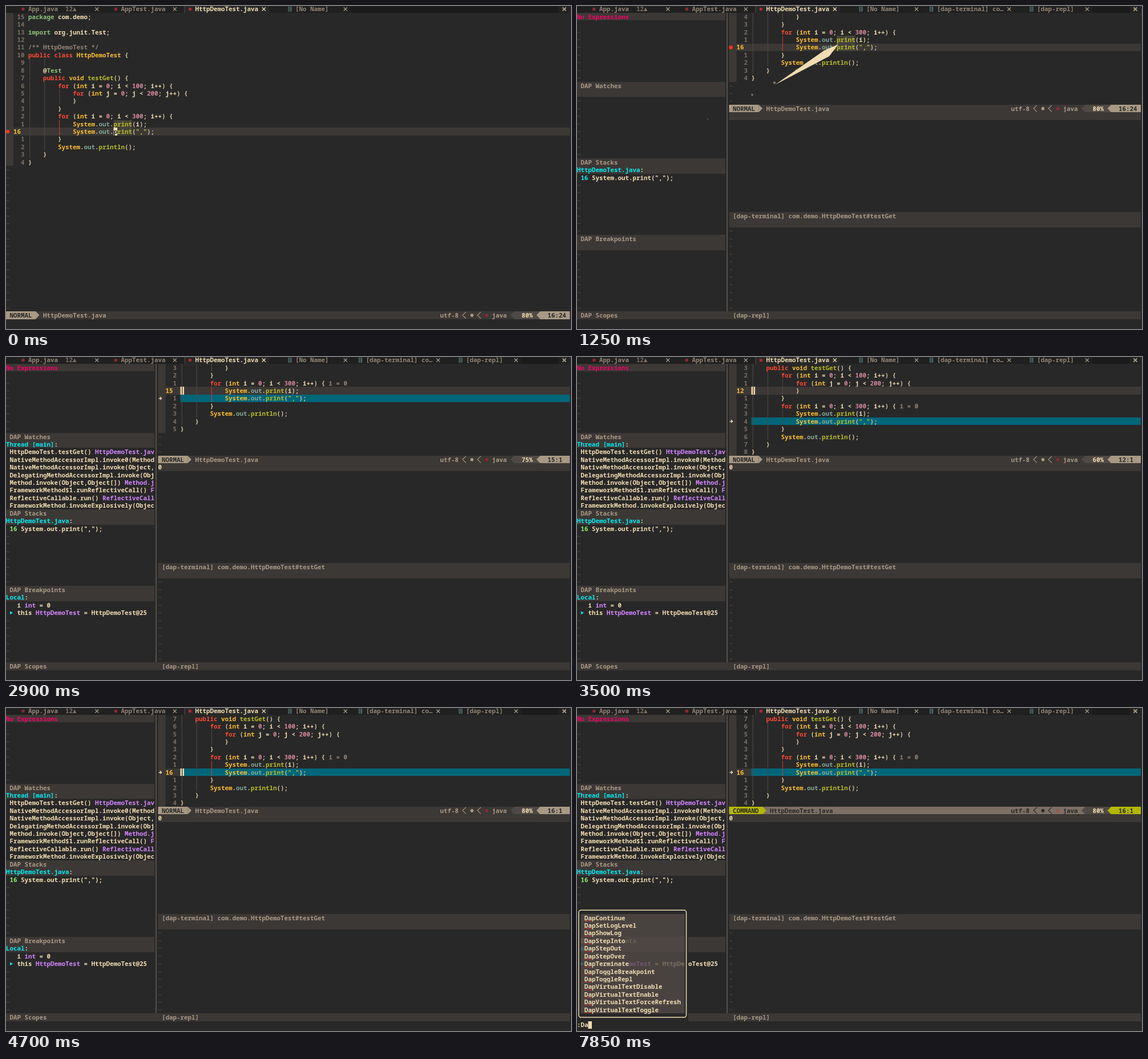
Write an HTML page with a canvas that moves like this. It is 990 px wide and 566 px high and loops after 8 s.

```html
<!DOCTYPE html>
<html lang="en">
<head>
<meta charset="utf-8">
<title>Debugger session</title>
<style>
html, body { margin: 0; width: 100%; height: 100%; overflow: hidden; background: #282828; }
canvas { display: block; }
</style>
</head>
<body>
<canvas id="stage" width="990" height="566"></canvas>
<script>
const g = document.getElementById('stage').getContext('2d');
const CW = 6.5, RH = 13.415, COLS = 152;
const BG = '#282828', BAR = '#3c3836', MUTED = '#a89984', CREAM = '#f0dcb0', DARK = '#1b1b1b';
const TEAL = '#00667a', GUIDE = '#504945', LIME = '#b5b800';
// Colour codes used in text as "~x"
const COLORS = {
  f: CREAM, d: '#d5c4a1', r: '#fb4934', y: '#fabd2f', g: '#b8bb26', a: '#8ec07c', b: '#83a598',
  n: '#d3869b', c: '#928374', m: MUTED, k: '#282828', l: '#7c6f64', t: '#5a524c',
  C: '#00ecf2', G: '#8ef06a', M: '#d484ff', P: '#f50067'
};

const forLoop = (v, n) => `~rfor ~d(~yint ~f${v} = ~n0~d; ~f${v} < ~n${n}~d; ~f${v}++~d) {`;
const call = (fn, arg) => `~ySystem~d.~bout~d.~g${fn}~d(${arg}~d);`;
const pad = n => ' '.repeat(n);
const CODE = [
  '~apackage ~fcom.demo~d;', '', '~aimport ~forg.junit.Test~d;', '',
  '~c/** HttpDemoTest */', '~rpublic class ~yHttpDemoTest ~d{', '',
  pad(4) + '~f@~aTest',
  pad(4) + '~rpublic ~yvoid ~gtestGet~d() {',
  pad(8) + forLoop('i', 100),
  pad(12) + forLoop('j', 200),
  pad(12) + '~d}', pad(8) + '~d}',
  pad(8) + forLoop('i', 300),
  pad(12) + call('print', '~fi'),
  pad(12) + call('print', '~g","'),
  pad(8) + '~d}',
  pad(8) + call('println', ''),
  pad(4) + '~d}', '~d}'
];
const THREADS = [
  '~CThread [main]~f:',
  ' HttpDemoTest.testGet() ~MHttpDemoTest.jav',
  ' NativeMethodAccessorImpl.invoke0(Method',
  ' NativeMethodAccessorImpl.invoke(Object,',
  ' DelegatingMethodAccessorImpl.invoke(Obj',
  ' Method.invoke(Object,Object[]) ~MMethod.j',
  ' FrameworkMethod$1.runReflectiveCall() ~MF',
  ' ReflectiveCallable.run() ~MReflectiveCall',
  ' FrameworkMethod.invokeExplosively(Objec'
];
const ALL = ['!', '#', '&', '<', '=', '>', '@', 'Alpha', 'AlphaRedraw', 'BufferCloseOther',
  ...['CloseLeft', 'CloseRight', 'CycleNext', 'CyclePrev', 'GoToBuffer', 'GroupClose',
    'GroupToggle', 'MoveNext'].map(s => 'BufferLine' + s)];
const DAP = ['Continue', 'SetLogLevel', 'ShowLog', 'StepInto', 'StepOut', 'StepOver', 'Terminate',
  'ToggleBreakpoint', 'ToggleRepl', 'VirtualTextDisable', 'VirtualTextEnable',
  'VirtualTextForceRefresh', 'VirtualTextToggle'].map(s => 'Dap' + s);
// [time, cursor line]
const MOVES = [[2900, 15], [3050, 14], [3200, 13], [3500, 12],
  [3800, 13], [4100, 14], [4400, 15], [4700, 16]];

const rowTop = r => r * RH - 1.5;
const mid = r => rowTop(r) + RH / 2 + .3;

function box(c, r, w, color, h = 1) {
  const y = Math.round(rowTop(r));
  g.fillStyle = color;
  g.fillRect(c * CW, y, w * CW, Math.round(rowTop(r + h)) - y);
}

function put(c, r, text, weight = 600) {
  g.font = `${weight} 10.833px "Noto Sans Mono", "DejaVu Sans Mono", monospace`;
  g.fillStyle = CREAM;
  text.split(/~(.)/).forEach((part, i) => {
    if (i % 2) { g.fillStyle = COLORS[part]; return; }
    for (const ch of part) {
      if (ch !== ' ') g.fillText(ch, c * CW, rowTop(r) + 10.9);
      c++;
    }
  });
}

function path(pts) {
  g.beginPath();
  pts.forEach(p => g.lineTo(...p));
}

function poly(color, ...pts) {
  g.fillStyle = color;
  path(pts);
  g.fill();
}

function stroke(color, width, ...pts) {
  g.strokeStyle = color;
  g.lineWidth = width;
  path(pts);
  g.stroke();
}

function disc(x, y, radius, color) {
  g.fillStyle = color;
  g.beginPath();
  g.arc(x, y, radius, 0, 7);
  g.fill();
}

const icon = (c, r, color) => disc((c + .6) * CW, mid(r), 2.8, color);

function tildes(c, from, to) {
  for (let r = from; r <= to; r++) put(c, r, '~t\u223c', 500);
}

function cross(c, color, width = 1.2) {
  const x = (c + .5) * CW, y = mid(0);
  stroke(color, width, [x - 3, y - 3], [x + 3, y + 3]);
  stroke(color, width, [x + 3, y - 3], [x - 3, y + 3]);
}

function tab(from, to, iconCol, name, closeCol, kind) {
  const active = kind === 'active';
  box(from, 0, to - from, active ? BG : '#202020');
  if (kind === 'file') {
    const x = iconCol * CW + .5;
    g.strokeStyle = '#5f8a8b';
    g.lineWidth = 1;
    g.strokeRect(x + .5, 2, 5, 7);
    stroke('#5f8a8b', 1, [x + 2, 4.5], [x + 4.5, 4.5]);
    stroke('#5f8a8b', 1, [x + 2, 6.5], [x + 4.5, 6.5]);
  } else icon(iconCol, 0, active ? '#a82a35' : '#8a2832');
  put(iconCol + 2, 0, (active ? '~f' : '~c') + name, active ? 700 : 600);
  cross(closeCol, active ? CREAM : MUTED);
}

function tabs(open) {
  box(0, 0, COLS, DARK);
  tab(0, 27, 4, 'App.java', 24);
  put(16, 0, '~l12');
  poly('#7c6f64', [117, 9], [120, 2.5], [123.5, 9]);
  tab(27, 48, 29, 'AppTest.java', 45);
  tab(48, 71, 49, 'HttpDemoTest.java', 69, 'active');
  stroke(GUIDE, 1, [313, 0], [313, 12]);
  tab(71, 93, 76, '[No Name]', 91, 'file');
  if (open) {
    tab(93, 118, 95, '[dap-terminal] co…', 116, 'file');
    tab(118, 139, 122, '[dap-repl]', 137, 'file');
  }
  box(149, 0, 3, '#222222');
  cross(150, MUTED, 2);
}

function guides(c0, r, line, cur) {
  const draw = (n, color) => {
    const x = (c0 + 6 + n + .5) * CW - .5;
    stroke(color, 1, [x, rowTop(r)], [x, rowTop(r + 1)]);
  };
  if (line > 6 && line < 20) draw(0, GUIDE);
  if (line === 7 || line > 9 && line < 19) draw(4, GUIDE);
  if (line === 11 || line === 12) draw(8, GUIDE);
  if (line === 15 || line === 16) draw(8, cur > 14 ? '#e03a2c' : GUIDE);
}

function breakSign(c, r, paused) {
  const x = c * CW, y = mid(r);
  if (!paused) { disc(x + 3, y, 3.3, '#fb3320'); return; }
  stroke(CREAM, 1.4, [x + 1, y], [x + 6, y]);
  stroke(CREAM, 1.4, [x + 3.5, y - 2.5], [x + 6, y], [x + 3.5, y + 2.5]);
}

function codeCursor(c0, r, paused) {
  if (paused) {
    const x = (c0 + 6.5) * CW;
    box(c0 + 6, r, 1, CREAM);
    stroke('#4a4038', 1.4, [x, rowTop(r)], [x, rowTop(r + 1)]);
  } else {
    box(c0 + 29, r, 1, CREAM);
    put(c0 + 29, r, '~kp');
  }
}

function editor(c0, last, s) {
  for (let r = 1; r <= last; r++) {
    const line = s.top + r - 1, here = line === s.cur;
    if (line > 20) { tildes(c0, r, r); continue; }
    box(c0, r, here ? COLS - c0 : 2, BAR);
    if (line === 16) {
      if (s.paused) box(c0 + 6, r, COLS - c0 - 6, TEAL);
      breakSign(c0, r, s.paused);
    }
    if (!s.paused && (line === 15 || line === 16)) box(c0 + 29, r, 5, '#45433a');
    guides(c0, r, line, s.cur);
    const n = String(Math.abs(line - s.cur));
    if (here) put(c0 + 2, r, '~y' + line, 700);
    else put(c0 + 5 - n.length, r, '~l' + n);
    put(c0 + 6, r, CODE[line - 1]);
    if (s.paused && line === 14) put(c0 + 46, r, '~ci = 0');
    if (here && !s.cmd && !s.flying) codeCursor(c0, r, s.paused);
  }
}

function status(c0, r, s) {
  const mode = s.cmd ? 'COMMAND' : 'NORMAL', accent = s.cmd ? LIME : MUTED;
  const ink = s.cmd ? '~k' : '~m', line = s.cmd ? BG : MUTED;
  const w = mode.length + 2, y0 = rowTop(r), y1 = rowTop(r + 1), ym = (y0 + y1) / 2;
  const arrow = (c, dir, color) => poly(color, [c * CW, y0], [(c + dir) * CW, ym], [c * CW, y1]);
  box(c0, r, COLS - c0, s.cmd ? '#7c6f64' : BAR);
  box(c0, r, w, accent);
  arrow(c0 + w, 1, accent);
  put(c0 + 1, r, '~k' + mode);
  put(c0 + w + 2, r, ink + 'HttpDemoTest.java');
  put(117, r, ink + 'utf-8');
  for (const c of [123, 127]) {
    stroke(line, 1.1, [c * CW + 6.5, y0 + 1], [c * CW + .5, ym], [c * CW + 6.5, y1 - 1]);
  }
  icon(125, r, line);
  icon(129, r, s.cmd ? '#a8504a' : '#8a2832');
  put(131, r, ink + 'java');
  box(137, r, 7, GUIDE);
  arrow(137, -1, GUIDE);
  put(139, r, `~f${s.cur * 5}%`, 700);
  box(144, r, 8, accent);
  arrow(144, -1, accent);
  put(146, r, `~k${s.cur}:${s.paused ? 1 : 24}`);
}

function sidePanes(paused) {
  box(0, 1, 40, BAR);
  put(0, 1, '~PNo Expressions');
  tildes(0, 3, 9);
  ['Watches', 'Stacks', 'Breakpoints'].forEach((name, i) => {
    const r = 10 + i * 10;
    box(0, r, 40, BAR, 2);
    put(1, r, '~mDAP ' + name);
  });
  put(0, 21, '~CHttpDemoTest.java~f:');
  put(1, 22, `${paused ? '~G' : '~C'}16 ~fSystem.out.print(",");`);
  tildes(0, 23, 29);
  if (paused) {
    THREADS.forEach((t, i) => put(0, 11 + i, t));
    put(0, 31, '~CLocal~f:');
    put(3, 32, 'i ~Mint ~f= 0');
    poly(COLORS.C, [7, mid(33) - 2.8], [12, mid(33)], [7, mid(33) + 2.8]);
    put(3, 33, 'this ~MHttpDemoTest ~f= HttpDemoTest@25');
    tildes(0, 34, 39);
  } else {
    tildes(0, 12, 19);
    tildes(0, 32, 39);
  }
  stroke('#665c54', 1.5, [263, rowTop(1)], [263, rowTop(40)]);
}

function lowerPanes(paused) {
  box(41, 14, 111, BAR);
  if (paused) put(41, 14, '0');
  box(41, 27, 111, BAR, 2);
  put(42, 27, '~m[dap-terminal] com.demo.HttpDemoTest#testGet');
  tildes(41, 29, 39);
  box(0, 40, COLS, BAR);
  put(1, 40, '~mDAP Scopes');
  put(42, 40, '~m[dap-repl]');
}

function popup(items, w, typed) {
  const n = items.length, first = 40 - n;
  box(0, first - 1, w, BG);
  box(0, 40, w, BG);
  box(0, first, 1, BG, n);
  box(w - 1, first, 1, BG, n);
  box(1, first, w - 2, 'rgba(83,75,72,.76)', n);
  items.forEach((item, i) => {
    const r = first + i, y = rowTop(r + 1) - 1;
    box(2, r, item.length, '#4a4341');
    put(2, r, item);
    if (typed) stroke('#c8352c', 1, [13, y], [13 + typed * CW, y]);
  });
  if (!typed) box(w - 2, first, 1, CREAM);
  g.strokeStyle = CREAM;
  g.lineWidth = 1.5;
  g.beginPath();
  g.roundRect(3, mid(first - 1), (w - 1) * CW, mid(40) - mid(first - 1), 4);
  g.stroke();
}

// Fading dots left behind a jumping cursor, oldest farthest from it
function trail(x, y, dx, dy, from, age) {
  for (let i = from; i < 6 + from; i++) {
    const life = 1 - i * .14 - age / 900;
    if (life > .03) {
      const alpha = .2 + .35 * life;
      disc(x + dx * i, y + dy * i, 2.7 * Math.min(1, life + .1), `rgba(240,220,176,${alpha})`);
    }
  }
}

function commandLine(time) {
  const typed = time < 7550 ? '' : time < 7850 ? 'D' : 'Da';
  if (typed) popup(DAP, 30, typed.length);
  else popup(ALL, 26, 0);
  put(0, 41, ':' + typed);
  trail(96, 426.3, 18, -26.3, 1, time - 7100);
  if (time < 7250) poly(CREAM, [99, 421], [10, 543], [8, 559], [19, 554]);
  else box(typed.length + 1, 41, 1, CREAM);
}

function draw(ms) {
  const time = 500 + Math.floor((ms - 500) / 150) * 150;
  const open = time >= 1100, paused = time >= 1550, cmd = time >= 7100;
  const cur = MOVES.filter(m => m[0] <= time).pop()?.[1] ?? 16;
  const top = !open ? 1 : time < 3500 ? Math.min(12, cur - 3) : 9;
  const s = { cur, top, paused, cmd, flying: time === 1100 || time === 1250 };

  g.fillStyle = BG;
  g.fillRect(0, 0, 990, 566);
  tabs(open);
  if (!open) {
    editor(0, 39, s);
    status(0, 40, s);
    if (time === 500 || time === 650) put(141, 41, time === 500 ? '<20>' : '<20>d');
    return;
  }
  sidePanes(paused);
  editor(41, 12, s);
  status(41, 13, s);
  lowerPanes(paused);
  if (time >= 1250 && time < 2150) trail(424, 92, -39, 21.2, 0, time - 1250);
  if (time === 1250) poly(CREAM, [347, 138], [433, 78], [458, 67], [442, 88]);
  if (cmd) commandLine(time);
}

const start = performance.now();
function tick() {
  draw((performance.now() - start) % 8000);
  requestAnimationFrame(tick);
}
tick();
</script>
</body>
</html>
```
